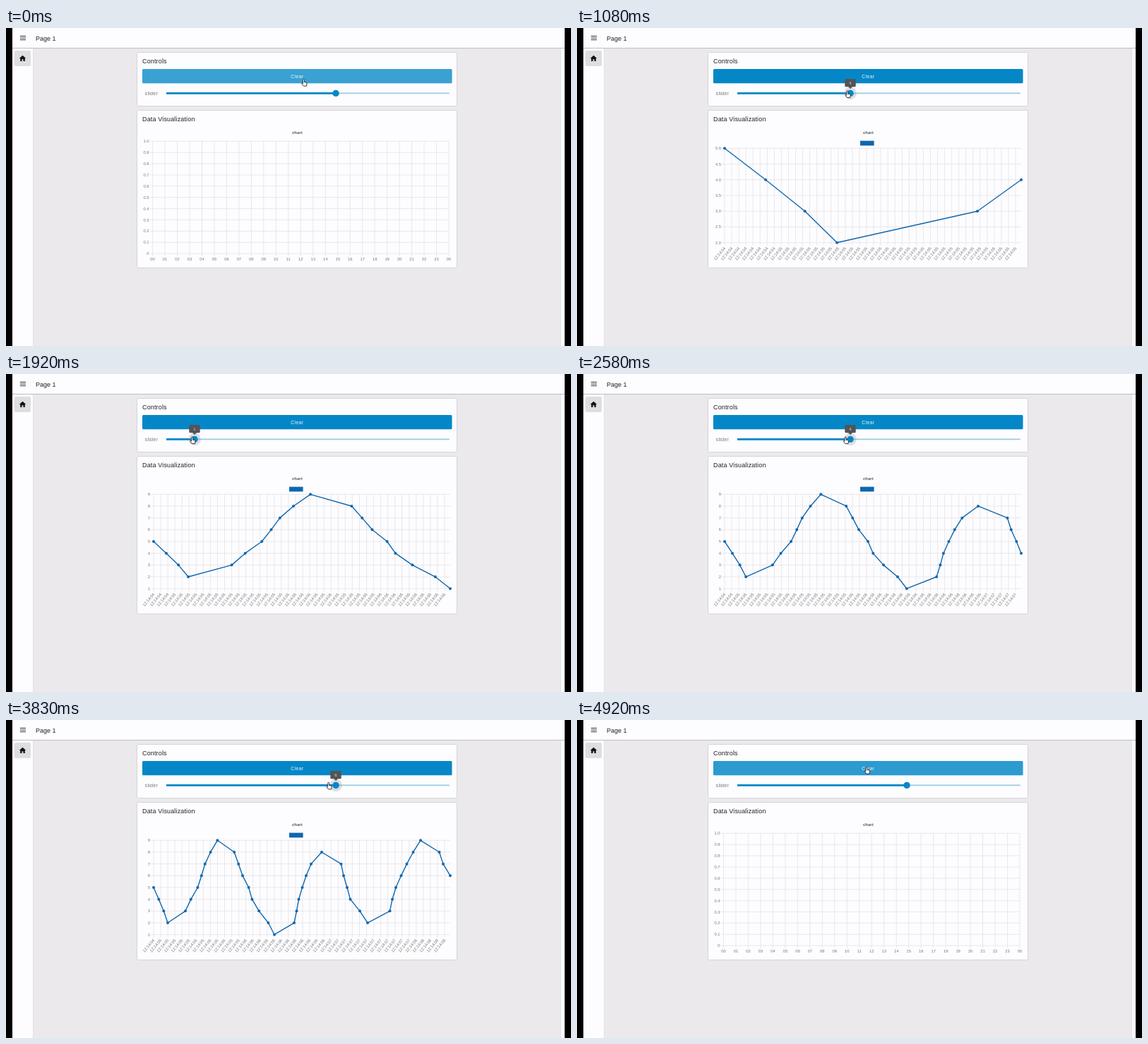
An HTML page with a canvas for the animation above (5 s loop, 800 by 450 pixels).

```html
<!DOCTYPE html>
<html lang="en">
<head>
<meta charset="utf-8">
<title>Slider and chart</title>
<style>
html, body { margin: 0; width: 100%; height: 100%; overflow: hidden; background: #000; }
canvas { display: block; width: 800px; height: 450px; }
</style>
</head>
<body>
<canvas id="stage" width="800" height="450"></canvas>
<script>
const ctx = document.getElementById('stage').getContext('2d');
const LOOP = 5000, STEP = LOOP / 60;
const PAPER = '#fdfcfe', BLUE = '#0587c7', LINE = '#1067ae', GRID = '#e4e3e7';
const DRAG_START = 706, MS_PER_UNIT = 6.557, CLEAR_AT = 4570;

// Slider readings: when each arrives (chart units) and its value.
const times = [0, 7.3, 14.3, 20, 45, 52.8, 62.4, 67.8, 72.8, 80.6, 90.4, 114.2, 120.2, 126,
  134.6, 139.4, 149.2, 162.4, 171, 199, 202.5, 205.5, 210.5, 216, 223, 238, 265.5, 269, 274,
  278.5, 292, 303, 334.5, 338, 343, 350.5, 358.5, 367.5, 378, 404.5, 410, 420];
const values = [...'543234567898765432123456787654323456789876'].map(Number);
const readings = times.map((u, i) => ({ u, v: values[i], t: DRAG_START + u * MS_PER_UNIT }));

const sliderX = v => 227 + 40 * v;

// Pointer knots [time, x, y]; the handle snaps halfway between two values.
const pointer = [[0, 421.5, 72.5], [420, 465, 88], [580, 465, 89]];
readings.forEach(({ t, v }, i) => {
  const before = i ? values[i - 1] : 6, next = readings[i + 1];
  pointer.push([t, sliderX((before + v) / 2) - 3, 89]);
  if (next) pointer.push([(t + next.t) / 2, sliderX(v) - 4, 89]);
});
pointer.push([3670, 457, 88.5], [3830, 457, 88.5], [4250, 412, 70], [4920, 410, 66.5], [5001, 410, 66.5]);

function pointerAt(t) {
  const i = pointer.findIndex(k => k[0] > t), a = pointer[i - 1], b = pointer[i];
  const f = (t - a[0]) / (b[0] - a[0]);
  return [a[1] + (b[1] - a[1]) * f, a[2] + (b[2] - a[2]) * f];
}

function rect(x, y, w, h, fill, radius = 0, stroke) {
  ctx.beginPath();
  ctx.roundRect(x, y, w, h, radius);
  ctx.fillStyle = fill;
  ctx.fill();
  if (stroke) { ctx.strokeStyle = stroke; ctx.lineWidth = 1; ctx.stroke(); }
}

function circle(x, y, r, fill) {
  ctx.beginPath();
  ctx.arc(x, y, r, 0, 7);
  ctx.fillStyle = fill;
  ctx.fill();
}

function line(points, color, width) {
  ctx.beginPath();
  points.forEach(p => ctx.lineTo(...p));
  ctx.strokeStyle = color;
  ctx.lineWidth = width;
  ctx.stroke();
}

function text(str, x, y, size, color, { align = 'left', weight = 400, spacing = 0 } = {}) {
  ctx.font = `${weight} ${size}px "Liberation Sans", Arial, sans-serif`;
  ctx.letterSpacing = spacing + 'px';
  ctx.textAlign = align;
  ctx.fillStyle = color;
  ctx.fillText(str, x, y);
}

const homeIcon = new Path2D('M23.5 38.7L28.2 43H26.8V47H24.5V44.2H22.5V47H20.2V43H18.8Z');
const hand = new Path2D('M-1 6V1a1 1 0 0 1 2 0V4.2L3.6 4.6Q4.6 4.8 4.5 6L4 9.6H-.2L-2.8 6.2Q-2.6 4.8-1 6Z');

function drawPage() {
  rect(0, 0, 800, 450, '#000');
  rect(9, 0, 782, 450, PAPER);
  rect(38, 28, 748, 422, '#ebe9ec');
  line([[38.5, 29], [38.5, 450]], '#e3e2e5', 1);
  line([[785.5, 29], [785.5, 450]], '#e3e2e5', 1);
  line([[9, 28.5], [791, 28.5]], '#bdbcbf', 1.2);
  for (const y of [11.5, 14.1, 16.7]) line([[19.8, y], [28, y]], '#333', 1);
  text('Page 1', 42, 17.5, 9, '#222');
  rect(12, 32, 23, 22, '#dedde0', 2);
  ctx.fillStyle = '#111';
  ctx.fill(homeIcon);
  rect(185.5, 34.5, 453, 76, PAPER, 2, '#d5d4d8');
  rect(185.5, 116.5, 453, 223, PAPER, 2, '#d5d4d8');
  text('Controls', 193, 49.6, 9, '#222', { spacing: .15 });
  text('Data Visualization', 193, 131.6, 9, '#222', { spacing: .15 });
  text('chart', 412.3, 149.8, 6, '#555', { align: 'center', weight: 700 });
}

function drawControls(t, value, hover) {
  rect(193, 58, 438.5, 20.3, BLUE, 1.5);
  rect(193, 58, 438.5, 20.3, `rgba(255,255,255,${hover})`, 1.5);
  text('Clear', 412.4, 70.8, 6.6, '#f4f9fc', { align: 'center', spacing: .5 });
  text('slider', 196.6, 95, 7.2, '#777', { spacing: .2 });

  const x = sliderX(value), active = t > 490 && t < 3920;
  line([[227, 92.4], [627.8, 92.4]], '#9bcce2', 1.9);
  line([[227, 92.4], [x, 92.4]], BLUE, 2.8);
  if (active) circle(x, 92.4, 8.8, 'rgba(120,130,145,.24)');
  circle(x, 92.4, 4.7, BLUE);
  if (!active) return;
  rect(x - 7.7, 72, 15.4, 11.2, '#535457', 1.5);
  ctx.beginPath();
  ctx.moveTo(x - 3, 83);
  ctx.lineTo(x + 3, 83);
  ctx.lineTo(x, 86);
  ctx.fill();
  text(value, x, 79.8, 6, '#d8d8da', { align: 'center' });
}

function axisY(low, high, step, left, right, top, bottom) {
  const digits = Math.max(0, -Math.floor(Math.log10(step)));
  const rows = Math.round((high - low) / step);
  for (let i = 0; i <= rows; i++) {
    const y = bottom - (bottom - top) * i / rows, v = low + i * step;
    line([[left - 4, y], [right, y]], GRID, .8);
    text(v ? v.toFixed(digits) : '0', left - 5, y + 2, 5.8, '#777', { align: 'right' });
  }
}

function drawEmptyChart() {
  axisY(0, 1, .1, 207.5, 627, 160.3, 319.2);
  for (let h = 0; h <= 24; h++) {
    const x = 207.5 + 17.48 * h;
    line([[x, 160.3], [x, 323]], GRID, .8);
    text(String(h % 24).padStart(2, '0'), x, 329.3, 5.8, '#777', { align: 'center' });
  }
}

function niceStep(range) {
  const raw = range / 10, power = 10 ** Math.floor(Math.log10(raw));
  return power * [1, 2, 5, 10].find(n => raw / power <= n + .01);
}

function drawChart(shown) {
  const left = 209, right = 629, top = 170.3, bottom = 303.7;
  const span = shown.at(-1).u || 1;
  let low = Math.min(...shown.map(r => r.v)), high = Math.max(...shown.map(r => r.v));
  if (low === high) { low *= .95; high *= 1.05; }

  axisY(low, high, niceStep(high - low), left, right, top, bottom);
  for (let i = 0; i < 42; i++) {
    const x = left + 10.05 * i, u = (x - left) / (right - left) * span;
    line([[x, top], [x, bottom + 4]], GRID, .8);
    ctx.save();
    ctx.translate(x + .5, 311);
    ctx.rotate(-50 * Math.PI / 180);
    text('12:14:0' + Math.floor(5 + (u - 10) / 118), 0, 1.5, 5.8, '#777', { align: 'right' });
    ctx.restore();
  }

  rect(401, 159.6, 19.6, 6.8, LINE);
  const points = shown.map(({ u, v }) => [
    left + (right - left) * u / span,
    bottom - (bottom - top) * (v - low) / (high - low)
  ]);
  line(points, LINE, 1.4);
  points.forEach(([x, y]) => circle(x, y, 2, LINE));
}

function drawPointer(x, y) {
  ctx.save();
  ctx.translate(x, y);
  ctx.fillStyle = '#fff';
  ctx.strokeStyle = '#222';
  ctx.lineWidth = .9;
  ctx.fill(hand);
  ctx.stroke(hand);
  ctx.restore();
}

function render(now) {
  const t = Math.floor((now % LOOP + 4) / STEP) % 60 * STEP;
  const shown = readings.filter(r => r.t <= t);
  const [x, y] = pointerAt(t);
  const hover = Math.min(1, Math.max(0, (79 - y) / 4)) * (t < 1000 ? .21 : .16);
  ctx.lineJoin = 'round';
  drawPage();
  drawControls(t, shown.length ? shown.at(-1).v : 6, hover);
  if (shown.length && t < CLEAR_AT) drawChart(shown);
  else drawEmptyChart();
  drawPointer(x, y);
}

const start = performance.now();
function tick() {
  render(performance.now() - start);
  requestAnimationFrame(tick);
}
tick();
</script>
</body>
</html>
```
